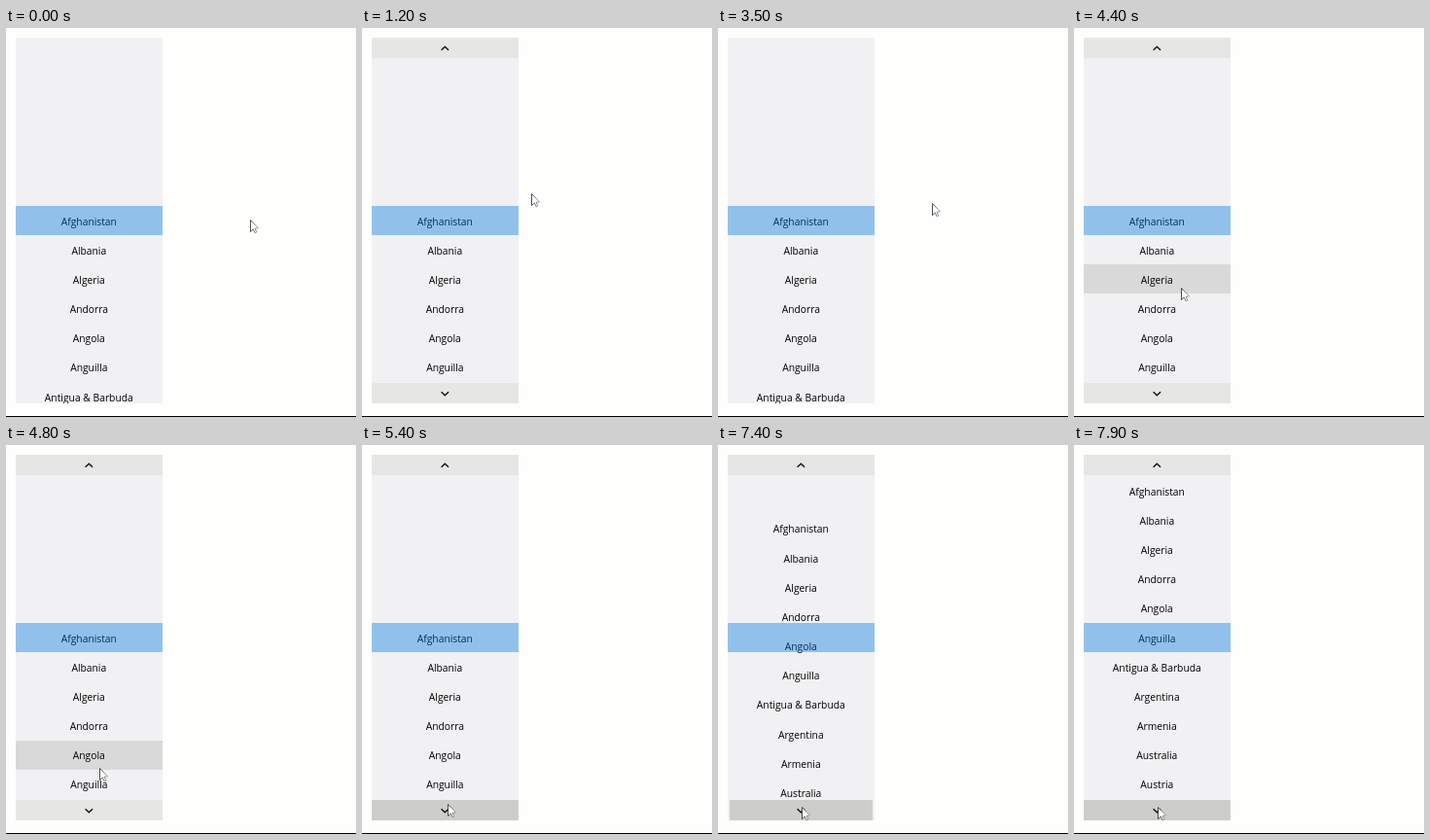
An HTML page with a canvas that plays this animation: 360 by 400 pixels, repeating every 8 s.

```html
<!DOCTYPE html>
<html lang="en">
<head>
<meta charset="utf-8">
<title>Country picker</title>
<style>
html, body { margin: 0; width: 100%; height: 100%; overflow: hidden; background: #fefefd; }
canvas { display: block; width: 360px; height: 400px; }
</style>
</head>
<body>
<canvas id="stage"></canvas>
<script>
const LOOP = 8000, STEP = 100, LAG = 300;
const LEFT = 10, RIGHT = 161, TOP = 10, BOTTOM = 386, MID = 85.3;
const BAND = 183, ROW = 30.15, BUTTON = 21;
const WIDTH = RIGHT - LEFT, LOW = BOTTOM - BUTTON;
const PRESS = 5800, RELEASE = 7800;
const countries = ["Afghanistan", "Albania", "Algeria", "Andorra", "Angola", "Anguilla",
  "Antigua & Barbuda", "Argentina", "Armenia", "Australia", "Austria", "Azerbaijan"];

// pointer strokes: start, end, then the point reached
const home = { x: 251, y: 197 };
const strokes = [
  [0, 500, 230, 277], [500, 900, 78, 159], [900, 1200, 174, 170],
  [1300, 1900, 211, 165], [2000, 2400, 205, 159], [2400, 2900, 90, 172],
  [3000, 3500, 220, 180], [3600, 4400, 110, 267], [4400, 5400, 88, 369],
  [5400, 5600, 86, 372]
];

const canvas = document.getElementById("stage");
const ctx = canvas.getContext("2d");
const scale = window.devicePixelRatio || 1;
canvas.width = 360 * scale;
canvas.height = 400 * scale;

const clamp = (v, lo, hi) => Math.min(hi, Math.max(lo, v));
const easeOut = k => 1 - (1 - k) ** 2;

function rect(x, y, w, h, color) {
  ctx.fillStyle = color;
  ctx.fillRect(x, y, w, h);
}

function pointerAt(t) {
  let { x, y } = home;
  for (const [from, to, px, py] of strokes) {
    const k = easeOut(clamp((t - from) / (to - from), 0, 1));
    x += (px - x) * k;
    y += (py - y) * k;
  }
  return { x, y };
}

// one row per 400 ms while the lower button is held
function scrollAt(t) {
  const rows = clamp((t - PRESS - 100) / 400, 0, 5);
  return ROW * (rows - 0.045 * Math.sin(Math.PI * (rows % 1)));
}

function labels(top, bottom, color, shift) {
  ctx.save();
  ctx.beginPath();
  ctx.rect(LEFT, top, WIDTH, bottom - top);
  ctx.clip();
  ctx.fillStyle = color;
  countries.forEach((name, i) => ctx.fillText(name, MID, 202.6 + i * ROW - shift));
  ctx.restore();
}

function chevron(y, dir) {
  ctx.beginPath();
  ctx.moveTo(MID - 3.7, y - 1.8 * dir);
  ctx.lineTo(MID, y + 1.8 * dir);
  ctx.lineTo(MID + 3.7, y - 1.8 * dir);
  ctx.strokeStyle = "#111";
  ctx.lineWidth = 1.4;
  ctx.stroke();
}

function arrow({ x, y }) {
  ctx.save();
  ctx.translate(Math.round(x) + 0.5, Math.round(y) + 0.5);
  ctx.beginPath();
  [[0, 0], [0, 12], [2.8, 9.4], [4.7, 13.3], [6.3, 12.5], [4.7, 8.7], [8, 8.3]]
    .forEach(p => ctx.lineTo(...p));
  ctx.closePath();
  ctx.fillStyle = "#fff";
  ctx.fill();
  const edge = ctx.createLinearGradient(0, 0, 7, 0);
  edge.addColorStop(0, "#222");
  edge.addColorStop(1, "#888");
  ctx.strokeStyle = edge;
  ctx.lineWidth = 0.8;
  ctx.stroke();
  ctx.restore();
}

function draw(t) {
  const pointer = pointerAt(t);
  const buttons = pointerAt(t - LAG).x < RIGHT;
  const shift = scrollAt(t);

  ctx.setTransform(scale, 0, 0, scale, 0, 0);
  ctx.font = '10.3px "Open Sans", "Noto Sans", sans-serif';
  ctx.textAlign = "center";
  rect(0, 0, 360, 400, "#fefefd");
  rect(0, 399, 360, 1, "#000");
  rect(LEFT, TOP, WIDTH, BOTTOM - TOP, "#f1f1f4");

  const row = Math.floor((pointer.y - BAND) / ROW);
  if (buttons && row > 0 && pointer.x < RIGHT && pointer.y < LOW) {
    rect(LEFT, Math.round(BAND + row * ROW), WIDTH, 30, "#d9d9da");
  }
  rect(LEFT, BAND, WIDTH, 30, "#91c1eb");

  labels(TOP, BAND, "#000", shift);
  labels(BAND, BAND + 30, "#062f55", shift);
  labels(BAND + 30, BOTTOM, "#000", shift);

  if (buttons) {
    const inset = t >= PRESS && t < RELEASE ? 2 : 0;
    rect(LEFT, TOP, WIDTH, BUTTON, "#e6e6e4");
    rect(LEFT, LOW, WIDTH, BUTTON, "#f1f1f4");
    rect(LEFT + inset, LOW, WIDTH - 2 * inset, BUTTON, pointer.y >= LOW ? "#cdcdcc" : "#e6e6e4");
    chevron(21, -1);
    chevron(376, 1);
  }
  arrow(pointer);
}

const start = performance.now();
function tick() {
  const t = (performance.now() - start) % LOOP;
  draw(Math.floor(t / STEP) * STEP);
  requestAnimationFrame(tick);
}
tick();
</script>
</body>
</html>
```
